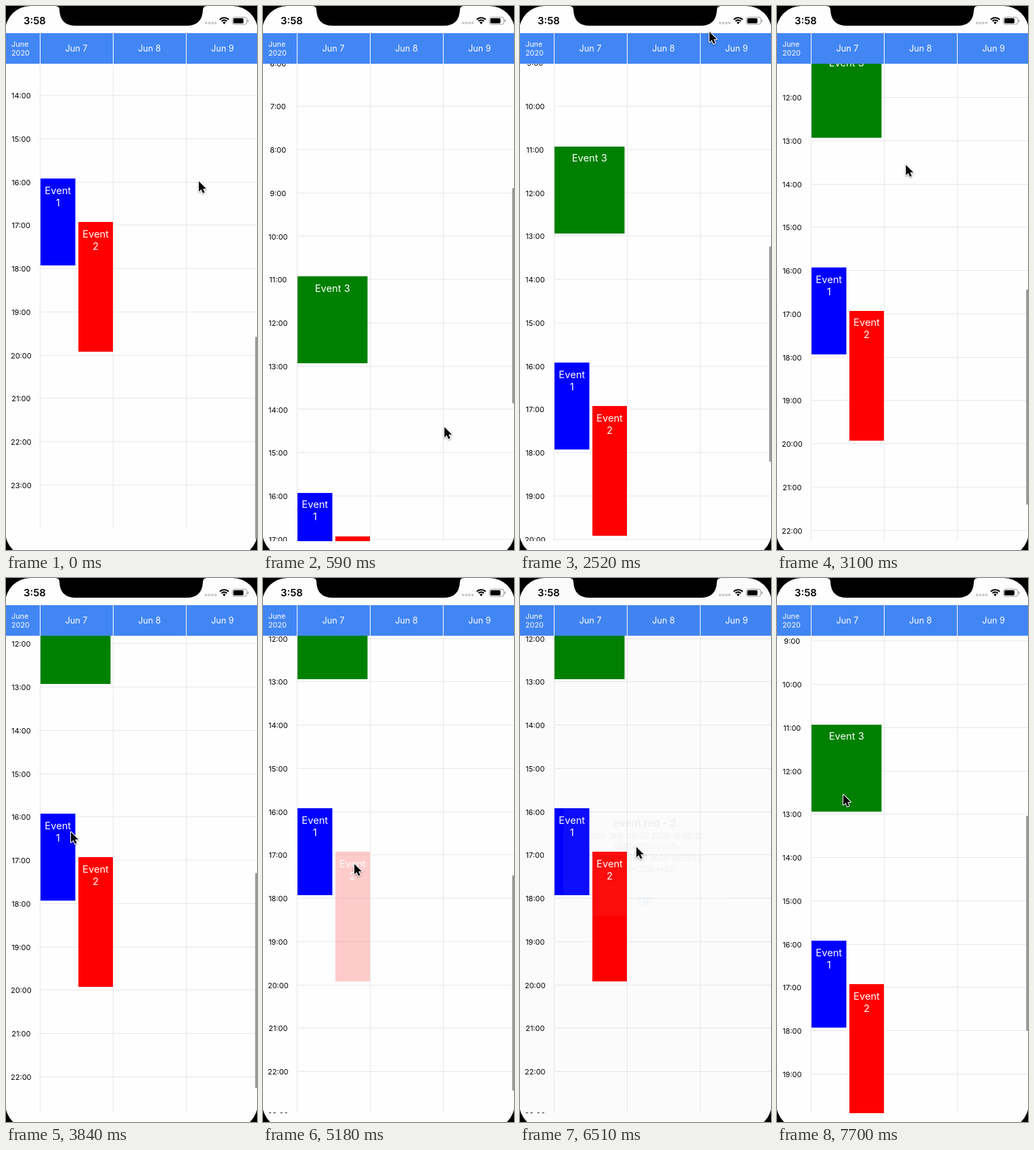
An HTML page with a canvas for the animation above (7.99 s loop, 371 by 801 pixels).

```html
<!DOCTYPE html>
<html lang="en">
<head>
<meta charset="utf-8">
<title>Week view</title>
<style>
  html, body { margin: 0; width: 100%; height: 100%; overflow: hidden; background: #fefefe; }
  canvas { display: block; width: 371px; height: 801px; }
</style>
</head>
<body>
<canvas id="stage"></canvas>
<script>
const W = 371, H = 801;
const LOOP = 7990, TICK = 147.9, LAST_TICK = 52;
const TOP = 85, BOTTOM = 788, HOUR = 63.75;
const PAPER = '#fefefe', GRID = '#e8e8e8', BLUE = '#4286f4';
const FONT = 'Inter, "Open Sans", sans-serif';

const canvas = document.getElementById('stage');
const ctx = canvas.getContext('2d');
const dpr = window.devicePixelRatio || 1;
canvas.width = W * dpr;
canvas.height = H * dpr;

const events = [
  { lines: ['Event', '1'], x: 51, w: 51.5, start: 15.93, hours: 2, color: '#0000ff' },
  { lines: ['Event', '2'], x: 107, w: 51, start: 16.93, hours: 3, color: '#ff0000', tappable: true },
  { lines: ['Event 3'], x: 51, w: 103.5, start: 10.93, hours: 2, color: '#008000' }
];

// Pointer path: tick, x, y
const pointerPath = [
  [0, 285, 258], [0.7, 285, 258], [3.4, 270, 650], [6, 262, 520], [10, 262, 348],
  [13, 270, 395], [14, 270, 395], [16.2, 280, 38], [17.5, 280, 38], [22, 165, 290],
  [26, 96, 374], [30, 117, 193], [33, 135, 421], [36, 135, 421], [40, 178, 470],
  [42, 178, 470], [44, 172, 396], [45, 125, 326], [46, 125, 326], [49, 119, 521],
  [50, 119, 521], [52, 98, 319]
];

const clamp = v => Math.max(0, Math.min(1, v));
const mix = (a, b, p) => a + (b - a) * clamp(p);

function pointerAt(tick) {
  let i = 1;
  while (i < pointerPath.length - 1 && pointerPath[i][0] < tick) i++;
  const [t0, x0, y0] = pointerPath[i - 1], [t1, x1, y1] = pointerPath[i];
  const p = (tick - t0) / (t1 - t0);
  return [mix(x0, x1, p), mix(y0, y1, p)];
}

// Y position of midnight: drags followed by decaying flings
function midnightAt(ms) {
  if (ms < 500) return mix(-761, -355, (ms - 100) / 400);
  if (ms < 2070) return -62 - 293 * Math.exp(-(Math.min(ms, 1930) - 500) / 430);
  if (ms < 2400) return mix(-72, -430, (ms - 2070) / 330);
  if (ms < 4430) return -676 + 186 * Math.exp(-(ms - 2516) / 421);
  return mix(-676, -481, (ms - 6808) / 444);
}

function text(str, x, y, size, color, align = 'center', weight = 400) {
  ctx.font = `${weight} ${size}px ${FONT}`;
  ctx.fillStyle = color;
  ctx.textAlign = align;
  ctx.fillText(str, x, y);
}

function rect(x, y, w, h, color) {
  ctx.fillStyle = color;
  ctx.fillRect(x, y, w, h);
}

function pill(x, y, w, h, r, color) {
  ctx.beginPath();
  ctx.roundRect(x, y, w, h, r);
  ctx.fillStyle = color;
  ctx.fill();
}

function drawGrid(midnight, pressAlpha) {
  ctx.save();
  ctx.beginPath();
  ctx.rect(0, TOP, W, BOTTOM - TOP);
  ctx.clip();

  const end = Math.min(BOTTOM, midnight + 24 * HOUR);
  for (let h = 0; h < 24; h++) {
    const y = midnight + h * HOUR;
    rect(50, Math.floor(y), W - 50, 1, GRID);
    if (h) text(`${h}:00`, 22.3, y + 4.6, 11, '#000');
  }
  for (const x of [50, 158, 266]) rect(x, TOP, 1, end - TOP, GRID);

  for (const e of events) {
    const y = midnight + e.start * HOUR;
    ctx.globalAlpha = e.tappable ? pressAlpha : 1;
    rect(e.x, Math.round(y - 0.2), e.w, Math.round(e.hours * HOUR), e.color);
    ctx.globalAlpha = 1;
    e.lines.forEach((line, i) => text(line, e.x + e.w / 2, y + 22.4 + i * 18, 14.7, '#fff'));
  }
  ctx.restore();
}

function drawScrollbar(midnight) {
  const top = 175 + 0.45 * (-92 - midnight);
  const end = Math.min(785, top + 317);
  const over = Math.max(0, -742 - midnight);
  const y = over ? 468 + over : top;
  pill(368.3, y, 3.2, end - y, 1.5, '#999');
}

function drawHeader() {
  rect(0, 40, W, 45, BLUE);
  for (const x of [50, 158, 266]) rect(x, 40, 1, 45, '#fff');
  text('June', 8, 60, 10.8, '#fff', 'left');
  text('2020', 8, 73, 10.8, '#fff', 'left');
  [7, 8, 9].forEach((day, i) => text(`Jun ${day}`, 104 + i * 108, 67, 12.7, '#fff'));
}

function drawStatus() {
  text('3:58', 26, 27, 14.8, '#000', 'left', 600);
  for (let i = 0; i < 4; i++) pill(294 + i * 4.6, 23.2, 3.6, 3.6, 1.3, '#c9c9c9');

  ctx.strokeStyle = '#000';
  ctx.lineWidth = 2.1;
  for (const r of [5.4, 9]) {
    ctx.beginPath();
    ctx.arc(322.5, 26.2, r, -Math.PI * 0.76, -Math.PI * 0.24);
    ctx.stroke();
  }
  ctx.beginPath();
  ctx.moveTo(322.5, 27);
  ctx.arc(322.5, 26.2, 3, -Math.PI * 0.76, -Math.PI * 0.24);
  ctx.fillStyle = '#000';
  ctx.fill();

  ctx.beginPath();
  ctx.roundRect(334.5, 16.5, 21.5, 10.5, 3);
  ctx.strokeStyle = '#999';
  ctx.lineWidth = 1;
  ctx.stroke();
  pill(336, 18, 15, 7.5, 1.6, '#000');
  pill(357, 20, 1.4, 3.6, 0.7, '#999');
}

function drawAlert(alpha, scale) {
  ctx.save();
  ctx.globalAlpha = alpha * 0.2;
  rect(0, 0, W, H, '#000');
  ctx.globalAlpha = alpha;
  ctx.translate(185.5, 415);
  ctx.scale(scale, scale);
  ctx.translate(-185.5, -415);
  pill(64, 333, 243, 164, 12.5, '#f8f8f8');
  rect(64, 456.5, 243, 0.7, '#c8c8ca');
  text('event red - 2', 184.5, 365.5, 15.2, '#000', 'center', 600);
  const message = [
    'Start: Sun Jun 07 2020 16:56:32', 'GMT+0700 (+07)',
    'End: Sun Jun 07 2020 19:56:32', 'GMT+0700 (+07)'
  ];
  message.forEach((line, i) => text(line, 185.5, 384 + i * 16.3, 11.2, '#000'));
  text('OK', 185.5, 482, 15.2, '#007aff');
  ctx.restore();
}

function drawBezel() {
  ctx.fillStyle = '#000';
  ctx.beginPath();
  ctx.rect(0, 0, W, H);
  ctx.roundRect(-1, 0, W + 2, 811, 37);
  ctx.fill('evenodd');
  ctx.fill(new Path2D('M73 0Q79 0 79 6Q80 29 103 29H267Q290 29 291 6Q291 0 297 0Z'));
}

const arrow = new Path2D('M0 0V15.2L3.5 12L6 17.6L8.6 16.5L6.2 11H11Z');

function drawPointer([x, y]) {
  ctx.save();
  ctx.translate(x, y);
  ctx.lineJoin = 'round';
  ctx.lineWidth = 2;
  ctx.strokeStyle = '#fff';
  ctx.shadowColor = 'rgba(0,0,0,.4)';
  ctx.shadowBlur = 2.5 * dpr;
  ctx.shadowOffsetY = dpr;
  ctx.stroke(arrow);
  ctx.shadowColor = 'transparent';
  ctx.fillStyle = '#000';
  ctx.fill(arrow);
  ctx.restore();
}

function draw(time) {
  const tick = Math.min(LAST_TICK, Math.floor((time % LOOP + 8) / TICK));
  const ms = tick * 148;
  const midnight = midnightAt(ms);
  const pressAlpha = ms >= 5100 && ms < 5600 ? mix(0.2, 1, (ms - 5280) / 150) : 1;
  const shown = clamp((ms - 5280) / 300);
  const alertAlpha = shown * clamp((6526 - ms) / 270);

  ctx.setTransform(dpr, 0, 0, dpr, 0, 0);
  rect(0, 0, W, H, PAPER);
  drawGrid(midnight, pressAlpha);
  if (ms < 5300 || ms > 6900) drawScrollbar(midnight);
  drawHeader();
  drawStatus();
  if (alertAlpha > 0) drawAlert(alertAlpha, mix(1.15, 1, 1 - (1 - shown) ** 2));
  drawBezel();
  drawPointer(pointerAt(tick));
}

const begin = performance.now();
function loop() {
  draw(performance.now() - begin);
  requestAnimationFrame(loop);
}
loop();
</script>
</body>
</html>
```
